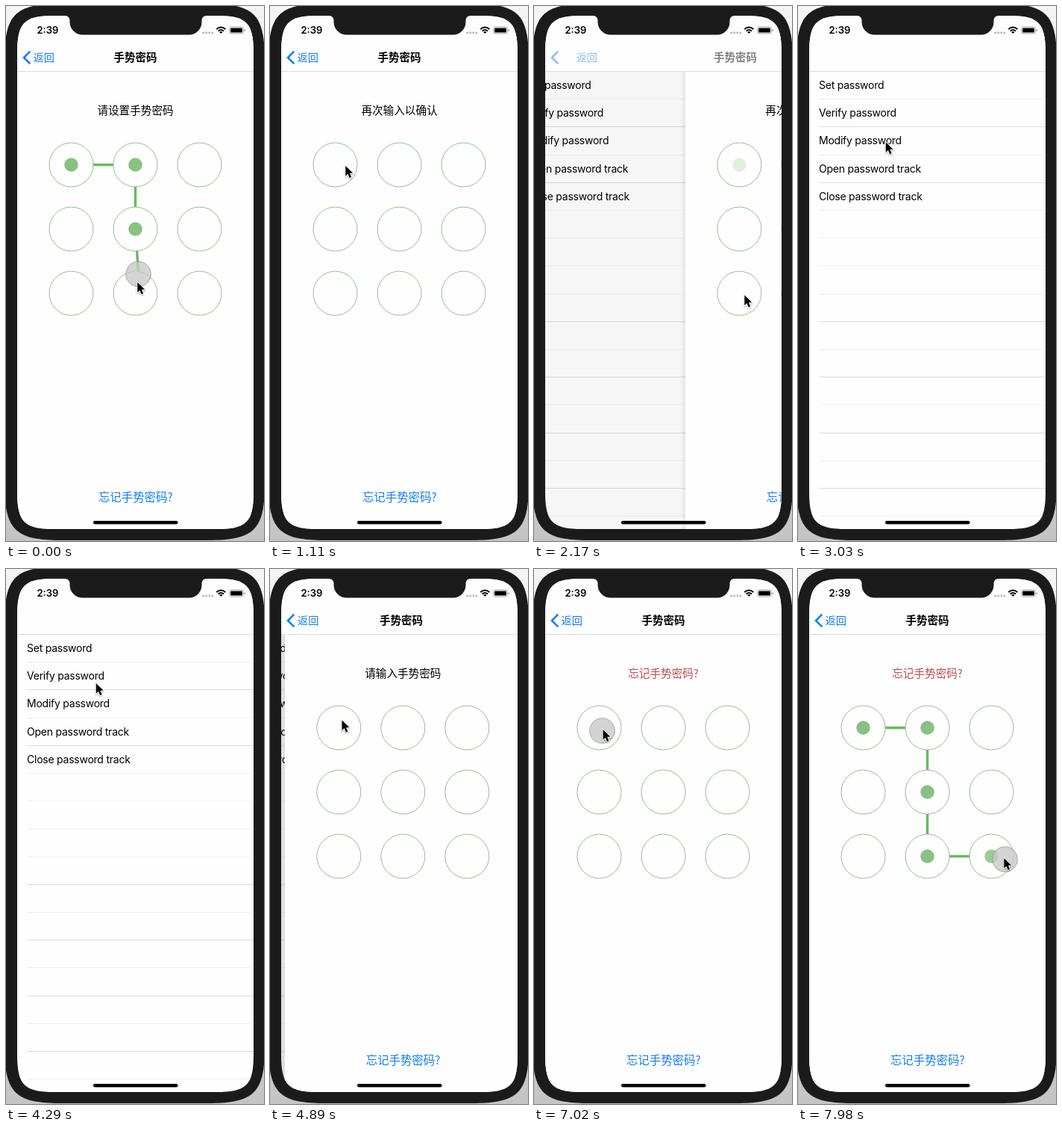
These frames come from a looping animation (346x716 px, 8 s). An HTML page with a canvas:

```html
<!DOCTYPE html>
<html lang="zh-CN">
<head>
<meta charset="utf-8">
<title>手势密码</title>
<style>
html, body { margin: 0; width: 100%; height: 100%; overflow: hidden; background: #fff; }
canvas { display: block; width: 346px; height: 716px; }
</style>
</head>
<body>
<canvas id="stage"></canvas>
<script>
const W = 346, H = 716, LOOP = 8000;
const LEFT = 15, RIGHT = 332, TOP = 13, BOTTOM = 700, NAV = 87, SCREEN = RIGHT - LEFT, MID = 173.5;
const CJK = '"Noto Sans CJK SC", "Noto Sans CJK", sans-serif';
const LATIN = 'Inter, "Open Sans", sans-serif';
const WHITE = '#fefefe', BLACK = '#1b1b1b', BLUE = '#127df8', RED = '#c6444b';
const RING = '#8fc28a', DOT = '#8bc085', LINE = '#69b962';
const GAP = 86, RADIUS = 29.5, ROW = 37.2;
const POP = 2038, PUSH = 4480;
const TOUCH_LAG = 30, LINE_LAG = 36, FADE_IN = 150, FADE_OUT = 280;

const canvas = document.getElementById('stage');
const ctx = canvas.getContext('2d');
const dpr = window.devicePixelRatio || 1;
canvas.width = W * dpr;
canvas.height = H * dpr;

const clamp = v => Math.max(0, Math.min(1, v));
const mix = (a, b, k) => a + (b - a) * k;

const nodes = Array.from({ length: 9 }, (_, i) => ({
  x: 87.5 + GAP * (i % 3),
  y: 212.5 + GAP * Math.floor(i / 3)
}));

// steady drag through the given nodes, running `over` pixels past the last
function makeSwipe(start, stop, order, over) {
  const route = order.map(i => nodes[i]);
  const speed = ((route.length - 1) * GAP + over) / (stop - start);
  return {
    start, stop, release: stop + 60,
    hits: route.map((node, i) => ({
      node, time: start + (i ? TOUCH_LAG + (i * GAP - RADIUS) / speed : 0)
    })),
    at(t) {
      const steps = (Math.min(t, stop) - start) * speed / GAP;
      const i = Math.min(Math.floor(steps), route.length - 2);
      const a = route[i], b = route[i + 1];
      return { x: mix(a.x, b.x, steps - i) + 4, y: mix(a.y, b.y, steps - i) + 4 };
    }
  };
}

// free move that starts fast and settles
function glide(start, stop, x, y) {
  return {
    start,
    at(t, from) {
      const k = 1 - (1 - clamp((t - start) / (stop - start))) ** 5;
      return { x: mix(from.x, x, k), y: mix(from.y, y, k) };
    }
  };
}

const swipes = [
  makeSwipe(-575, 327, [0, 1, 4, 7, 8], 33),
  makeSwipe(1180, 1900, [0, 1, 4, 7, 8], 20),
  makeSwipe(5457, 6082, [0, 3, 6, 7], 38),
  makeSwipe(7015, 7940, [0, 1, 4, 7, 8], 14)
];
const [first, second, check, retry] = swipes;
const home = first.at(first.start);
const tap = { start: 4380, release: 4470 };
const legs = [
  first, glide(500, 1110, home.x + 11, home.y - 1),
  second, glide(2200, 3700, 116, 180), glide(3940, 4270, 122, 154.5), glide(4700, 5400, home.x, home.y),
  check, glide(6140, 6800, home.x + 2, home.y),
  retry
];

function pointAt(t, last = legs.length - 1) {
  let i = last;
  while (i > 0 && legs[i].start > t) i--;
  const leg = legs[i];
  return leg.at(t, leg.hits ? null : pointAt(leg.start, i - 1));
}

function spring(ms) {
  const x = Math.max(0, ms) * 0.015;
  return 1 - (1 + x) * Math.exp(-x);
}

function pageShare(t) {
  const v = t < PUSH ? 1 - spring(t - POP) : spring(t - PUSH);
  return v < 0.002 ? 0 : v > 0.998 ? 1 : v;
}

function text(str, x, y, font, color = '#000', align = 'center', spacing = 0) {
  ctx.font = font;
  ctx.letterSpacing = spacing + 'px';
  ctx.textAlign = align;
  ctx.fillStyle = color;
  ctx.fillText(str, x, y);
}

function rect(x, y, w, h, color) {
  ctx.fillStyle = color;
  ctx.fillRect(x, y, w, h);
}

function box(x, y, w, h, r, color) {
  ctx.beginPath();
  ctx.roundRect(x, y, w, h, r);
  ctx.fillStyle = color;
  ctx.fill();
}

// rectangle whose corners ease into the sides
function softRect(x, y, w, h, r) {
  const e = r * 1.53, c = e * 0.18;
  ctx.beginPath();
  ctx.moveTo(x + e, y);
  ctx.lineTo(x + w - e, y);
  ctx.bezierCurveTo(x + w - c, y, x + w, y + c, x + w, y + e);
  ctx.lineTo(x + w, y + h - e);
  ctx.bezierCurveTo(x + w, y + h - c, x + w - c, y + h, x + w - e, y + h);
  ctx.lineTo(x + e, y + h);
  ctx.bezierCurveTo(x + c, y + h, x, y + h - c, x, y + h - e);
  ctx.lineTo(x, y + e);
  ctx.bezierCurveTo(x, y + c, x + c, y, x + e, y);
}

function disc(x, y, r, fill, edge) {
  ctx.beginPath();
  ctx.arc(x, y, r, 0, Math.PI * 2);
  ctx.fillStyle = fill;
  ctx.fill();
  if (!edge) return;
  ctx.strokeStyle = edge;
  ctx.lineWidth = 1;
  ctx.stroke();
}

function stroke(color, width, ...points) {
  ctx.beginPath();
  points.forEach(([x, y]) => ctx.lineTo(x, y));
  ctx.strokeStyle = color;
  ctx.lineWidth = width;
  ctx.stroke();
}

function drawBody() {
  const g = ctx.createLinearGradient(0, 0, 0, H);
  g.addColorStop(0, '#f4f4f4');
  g.addColorStop(1, '#c4c4c4');
  rect(0, 0, W, H, g);
  softRect(-2, -3, W + 3, 718, 50);
  ctx.fillStyle = BLACK;
  ctx.fill();
}

function drawList(share) {
  const rows = ['Set password', 'Verify password', 'Modify password', 'Open password track', 'Close password track'];
  ctx.save();
  ctx.translate(-0.3 * SCREEN * share, 0);
  for (let k = 1; k <= 16; k++) {
    const strong = k < 5 ? k % 2 === 0 : k > 8 && k % 2 === 1;
    rect(28, Math.round(NAV + ROW * k), SCREEN + 100, 1, strong ? '#dcdcdc' : '#f0f0f0');
  }
  rows.forEach((row, i) => text(row, 28, 111 + ROW * i, '14px ' + LATIN, '#000', 'left', -0.24));
  ctx.restore();
  rect(LEFT, NAV, SCREEN, BOTTOM - NAV, `rgba(0,0,0,${0.08 * share})`);
}

function drawLabel(t) {
  const font = '14.6px ' + CJK;
  const wrong = t - check.release;
  if (wrong >= 0) {
    const shake = wrong < 300 ? -5 * Math.sin(wrong / 50 * Math.PI) : 0;
    text('忘记手势密码?', MID + shake, 145, font, RED);
  } else {
    const msg = t < first.release ? '请设置手势密码' : t < PUSH ? '再次输入以确认' : '请输入手势密码';
    text(msg, MID, 145, font);
  }
}

function drawPattern(t) {
  const swipe = swipes.find(s => t >= s.start && t < s.release + FADE_OUT);
  const hits = swipe ? swipe.hits.filter(h => h.time <= t) : [];
  if (hits.length && t < swipe.release) {
    const end = pointAt(Math.max(swipe.start, t - LINE_LAG));
    stroke(LINE, 3.5, ...hits.map(h => [h.node.x, h.node.y]), [end.x, end.y]);
  }
  nodes.forEach(n => disc(n.x, n.y, RADIUS, WHITE, RING));
  hits.forEach(({ node, time }) => {
    ctx.globalAlpha = clamp((t - time) / FADE_IN) * (1 - clamp((t - swipe.release) / FADE_OUT));
    disc(node.x, node.y, 9.3, DOT);
  });
  ctx.globalAlpha = 1;
}

function drawPage(t, share) {
  ctx.save();
  ctx.translate(SCREEN * (1 - share), 0);
  if (share < 1) {
    const g = ctx.createLinearGradient(LEFT - 6, 0, LEFT, 0);
    g.addColorStop(0, 'rgba(0,0,0,0)');
    g.addColorStop(1, 'rgba(0,0,0,0.08)');
    rect(LEFT - 6, NAV, 6, BOTTOM - NAV, g);
  }
  rect(LEFT, NAV, SCREEN, BOTTOM - NAV, WHITE);
  drawLabel(t);
  drawPattern(t);
  text('忘记手势密码?', MID + 0.3, 663.4, '15.4px ' + CJK, BLUE);
  ctx.restore();
}

function drawNav(share) {
  rect(LEFT, TOP, SCREEN, NAV - TOP, WHITE);
  rect(LEFT, NAV, SCREEN, 1, '#dfdfdf');
  ctx.globalAlpha = clamp(share * 1.2);
  stroke(BLUE, 2.6, [32.3, 60.7], [24, 69], [32.3, 77.3]);
  text('返回', 36.5 + 34 * (1 - share), 74, '14.2px ' + CJK, BLUE, 'left');
  text('手势密码', MID + 163 * (1 - share), 74, 'bold 14.5px ' + CJK);
  ctx.globalAlpha = 1;
}

function drawStatus() {
  text('2:39', 41.5, 37, '600 13px ' + LATIN, '#000', 'left');
  for (let i = 0; i < 4; i++) box(263.3 + 4 * i, 34.6, 2.8, 2.6, 1, '#b8b8b8');
  const a = Math.PI / 4;
  ctx.strokeStyle = '#000';
  ctx.lineWidth = 2;
  for (const r of [8.6, 5.3, 2]) {
    ctx.beginPath();
    ctx.arc(288.3, 37.2, r, a - Math.PI, -a);
    ctx.stroke();
  }
  ctx.beginPath();
  ctx.roundRect(299.5, 28, 19, 9, 2.5);
  ctx.strokeStyle = '#a5a5a5';
  ctx.lineWidth = 1;
  ctx.stroke();
  box(301, 29.5, 16, 6, 1.3, '#000');
  box(319.6, 31, 1.4, 3.2, 0.7, '#a5a5a5');
  box(117, 689, 113.5, 4.6, 2.3, '#000');
}

function drawNotch() {
  const l = 85.5, r = 262.5, base = 38.5;
  ctx.beginPath();
  ctx.moveTo(l - 7, TOP - 1);
  ctx.lineTo(l - 7, TOP);
  ctx.arcTo(l, TOP, l, base, 6);
  ctx.arcTo(l, base, r, base, 17);
  ctx.arcTo(r, base, r, TOP, 17);
  ctx.arcTo(r, TOP, r + 7, TOP, 6);
  ctx.lineTo(r + 7, TOP);
  ctx.lineTo(r + 7, TOP - 1);
  ctx.fillStyle = BLACK;
  ctx.fill();
}

function drawTouch(t) {
  const press = [...swipes, tap].find(s => t >= s.start && t < s.release);
  if (!press) return;
  const p = pointAt(Math.max(press.start, t - TOUCH_LAG));
  disc(p.x, p.y, 16.8, 'rgba(202,202,202,0.8)', 'rgba(140,140,140,0.7)');
}

function drawCursor(t) {
  const p = pointAt(t);
  ctx.save();
  ctx.translate(p.x - 1.2, p.y - 1.5);
  ctx.beginPath();
  [[0, 0], [0, 13.6], [3.1, 10.7], [5.4, 16], [7.8, 15], [5.6, 9.8], [9.8, 9.6]].forEach(([x, y]) => ctx.lineTo(x, y));
  ctx.closePath();
  ctx.shadowColor = 'rgba(0,0,0,0.35)';
  ctx.shadowBlur = 2 * dpr;
  ctx.shadowOffsetY = dpr;
  ctx.strokeStyle = '#fff';
  ctx.lineWidth = 1.8;
  ctx.stroke();
  ctx.shadowColor = 'transparent';
  ctx.fillStyle = '#000';
  ctx.fill();
  ctx.restore();
}

function draw(t) {
  const share = pageShare(t);
  ctx.setTransform(dpr, 0, 0, dpr, 0, 0);
  drawBody();
  ctx.save();
  softRect(LEFT, TOP, SCREEN, BOTTOM - TOP, 33);
  ctx.clip();
  rect(LEFT, TOP, SCREEN, BOTTOM - TOP, WHITE);
  if (share < 1) drawList(share);
  if (share > 0) drawPage(t, share);
  drawNav(share);
  drawStatus();
  ctx.restore();
  drawNotch();
  drawTouch(t);
  drawCursor(t);
}

const began = performance.now();
function tick() {
  draw((performance.now() - began) % LOOP);
  requestAnimationFrame(tick);
}
tick();
</script>
</body>
</html>
```
